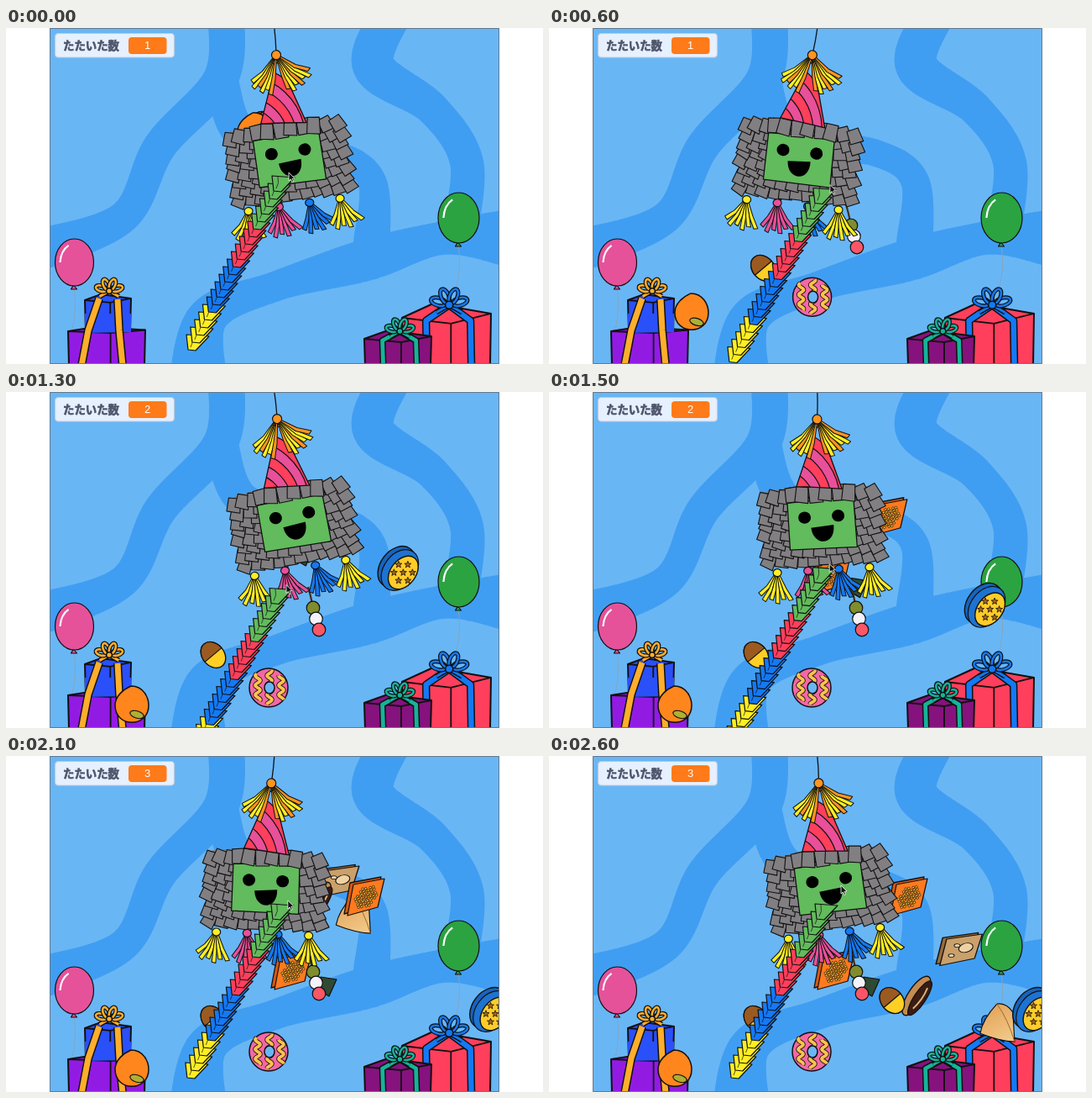
Recreate the animation shown at these times as an HTML page with a canvas. Size 640 by 400 pixels, loop 2.7 s.

```html
<!DOCTYPE html>
<html lang="ja">
<head>
<meta charset="utf-8">
<style>
html, body { margin: 0; width: 100%; height: 100%; overflow: hidden; background: #fff; }
canvas { display: block; }
</style>
</head>
<body>
<canvas id="stage" width="640" height="400"></canvas>
<script>
const c = document.getElementById('stage').getContext('2d');
const LOOP = 2700, STEP = 100, TAU = Math.PI * 2;
const INK = '#111', YELLOW = '#ffee22', ORANGE = '#ff9420', PINK = '#e8509a',
      RED = '#ff3f5c', BLUE = '#1479f5', GREEN = '#62bb5c', GRAY = '#827f82',
      TEAL = '#16b39a', GOLD = '#ffae2b';

// ---------- helpers ----------
const lerp = (a, b, k) => a + (b - a) * k;
const clamp = k => Math.min(1, Math.max(0, k));

function paint(fill, stroke = INK, width = 1.2) {
  if (fill) { c.fillStyle = fill; c.fill(); }
  if (stroke) { c.strokeStyle = stroke; c.lineWidth = width; c.stroke(); }
}
function poly(pts, fill, stroke, width) {
  c.beginPath();
  pts.forEach(p => c.lineTo(...p));
  c.closePath();
  paint(fill, stroke, width);
}
function oval(x, y, rx, ry, fill, stroke, width, turn = 0) {
  c.beginPath();
  c.ellipse(x, y, rx, ry, turn, 0, TAU);
  paint(fill, stroke, width);
}
function curve(from, via, to, stroke = INK, width = 1.2) {
  c.beginPath();
  c.moveTo(...from);
  c.quadraticCurveTo(...via, ...to);
  paint(null, stroke, width);
}
function band(pts, color, width) {
  c.beginPath();
  pts.forEach(p => c.lineTo(...p));
  paint(null, INK, width + 3);
  paint(null, color, width);
}
function at(x, y, turn, draw) {
  c.save();
  c.translate(x, y);
  c.rotate(turn);
  draw();
  c.restore();
}
function randomizer(seed) {
  return () => (seed = (seed * 16807) % 2147483647) / 2147483647;
}
// A centre and a ring of six around it
function cluster(radius, draw) {
  draw(0, 0);
  for (let a = 0; a < TAU - .1; a += TAU / 6) draw(radius * Math.cos(a), radius * Math.sin(a));
}

// ---------- scenery ----------
// Smooth path through [x, y, radius] knots, swept with a round brush
function stream(knots) {
  const knot = i => knots[Math.min(knots.length - 1, Math.max(0, i))];
  c.beginPath();
  for (let i = 0; i < knots.length - 1; i++) {
    for (let k = 0; k < 1; k += 1 / 60) {
      const [x, y, r] = [0, 1, 2].map(j => {
        const [a, b, d, e] = [-1, 0, 1, 2].map(o => knot(i + o)[j]);
        return b + .5 * k * (d - a + k * (2 * a - 5 * b + 4 * d - e + k * (3 * (b - d) + e - a)));
      });
      c.moveTo(x + r, y);
      c.arc(x, y, r, 0, TAU);
    }
  }
  paint('#409ef2', null);
}
function background() {
  c.fillStyle = '#69b6f5';
  c.fillRect(52, 0, 536, 400);
  stream([[262, -20, 22], [256, 60, 21], [184, 140, 20], [140, 225, 19], [40, 264, 25]]);
  stream([[256, 60, 20], [285, 130, 20], [390, 149, 16], [436, 182, 17], [436, 255, 22]]);
  stream([[229, 430, 36], [240, 345, 24], [320, 308, 18], [430, 276, 25], [520, 250, 20], [600, 250, 34]]);
  stream([[462, -20, 23], [438, 45, 25], [508, 96, 20], [549, 160, 20], [540, 245, 22]]);
}
function balloon(x, y, rx, ry, color) {
  curve([x - 1, y + ry], [x + 4, y + ry + 25], [x - 3, y + ry + 54], '#86a4ba', .9);
  poly([[x - 1, y + ry - 1], [x - 4, y + ry + 4], [x + 3, y + ry + 4]], color);
  oval(x, y, rx, ry, color);
  curve([x - rx * .74, y], [x - rx * .7, y - ry * .5], [x - rx * .3, y - ry * .72], '#fff', 2.2);
}
function bow(x, y, s, color) {
  for (const side of [-1, 1]) {
    band([[x, y], [x + side * 12 * s, y + 7 * s]], color, 3);
    for (const [dx, dy, tilt] of [[10, -3, 1.3], [4, -8, .4]]) {
      oval(x + side * dx * s, y + dy * s, 3.6 * s, 7 * s, null, INK, 5, side * tilt);
      oval(x + side * dx * s, y + dy * s, 3.6 * s, 7 * s, null, color, 2.6, side * tilt);
    }
  }
  oval(x, y, 3.5 * s, 3.5 * s, color, INK, 1.5);
}
function box(x, y, w, depth, bottom, color) {
  const left = [x, y], back = [x + w * .35, y - depth],
        right = [x + w, y - depth * .3], front = [x + w * .55, y + depth * .4];
  poly([left, back, right, [x + w - 1, bottom], [x + 1, bottom]], color, INK, 2);
  c.beginPath();
  [left, front, right].forEach(p => c.lineTo(...p));
  c.moveTo(...front);
  c.lineTo(front[0], bottom);
  paint(null, INK, 1.8);
}
function tiedBox(x, y, w, depth, color, ribbon) {
  box(x, y, w, depth, 402, color);
  const knot = [x + w * .53, y - depth * .9];
  for (const side of [.27, .77]) band([knot, [x + w * side, y + depth * .2], [x + w * side + 1, 402]], ribbon, w * .06);
  bow(...knot, w / 82, ribbon);
}
function scenery() {
  balloon(81.5, 279, 23, 28, '#e5529a');
  balloon(539.5, 226, 24.5, 30, '#2ba341');
  box(94, 324, 55, 7, 362, '#2a50fa');
  box(74, 361, 92, 5, 402, '#921be4');
  poly([[94, 340], [149, 340], [149, 362], [94, 363]], '#2a50fa', null);
  band([[111, 322], [98, 360], [90, 402]], GOLD, 7);
  band([[133, 323], [135, 360], [139, 402]], GOLD, 7);
  bow(123, 313, .95, GOLD);
  tiedBox(472, 345, 106, 17, RED, BLUE);
  tiedBox(427, 370, 80, 10, '#86127e', TEAL);
}

// ---------- treats ----------
function orange() {
  c.beginPath();
  c.moveTo(-1, -22);
  c.bezierCurveTo(14, -22, 20, -8, 20, 1);
  c.bezierCurveTo(20, 28, -20, 28, -20, 1);
  c.bezierCurveTo(-20, -10, -10, -18, -1, -22);
  paint('#ff861c', INK, 1.5);
  oval(6, 12, 8.5, 4.2, '#aeb035', INK, 1.2, .3);
}
function donut() {
  oval(0, 0, 23, 23, '#f467a5', INK, 1.5);
  for (const x of [-13, 1, 15]) {
    const h = Math.sqrt(440 - x * x);
    c.beginPath();
    for (let y = -h; y <= h; y++) c.lineTo(x + 3 * Math.sin(y * .55), y);
    paint(null, INK, 5.5);
    paint(null, '#ffc24d', 3.8);
  }
  oval(1, 0, 6, 7, '#69b6f5', INK, 1.5);
}
function acorn() {
  at(0, 0, -.7, () => {
    oval(0, 0, 13, 17, '#ffcf24', INK, 1.4);
    c.beginPath();
    c.ellipse(0, 0, 13, 17, 0, Math.PI, 0);
    c.closePath();
    paint('#9b5a20');
  });
}
function dango() {
  curve([-9, -38], [-6, -28], [-4, -18], '#442c16', 2.2);
  ['#7f8d2d', '#f4f2fa', '#fa5667'].forEach((color, i) => oval(-3 + i * 3.5, -13 + i * 13, 7.8, 7.8, color));
}
function star(x, y) {
  c.beginPath();
  for (let i = 0; i < 10; i++) {
    const r = i % 2 ? 1.8 : 4.2, a = i * Math.PI / 5;
    c.lineTo(x + r * Math.sin(a), y - r * Math.cos(a));
  }
  c.closePath();
  paint('#a5641b', INK, .8);
}
function bowl() {
  oval(-4, -4, 19, 27, '#1764bd', INK, 1.4, .65);
  oval(0, 0, 19, 27, '#1d73d2', INK, 1.2, .65);
  oval(4, 3, 15, 22, '#ffcc28', INK, 1.4, .65);
  cluster(11, (x, y) => star(4 + x, 3 + y));
}
function slab(front, side) {
  const corners = [[-14, -15], [23, -22], [15, 12], [-21, 22]];
  poly(corners.map(([x, y]) => [x - 4, y - 2]), side, INK, 1.3);
  poly(corners, front);
}
function cracker() {
  slab('#ff7a1f', '#d8590f');
  cluster(9, (x, y) => cluster(3.6, (dx, dy) => {
    const u = x + dx, v = y + dy;
    oval(1 + u - v * .22, v - u * .2, 1.4, 1.4, '#ffc233', INK, .7);
  }));
}
function toast() {
  c.save();
  c.scale(1.15, .85);
  slab('#caa06b', '#9a6c3c');
  oval(6, -3, 8, 6, '#efd2a2', INK, 1, -.6);
  for (const i of [0, 1]) oval(-9 + i * 6, 8 - i * 14, 3, 2.4, '#efd2a2', INK, .9);
  c.restore();
}
function leafWrap() {
  poly([[-9, -10], [10, -7], [1, 13], [-11, 6]], '#2f4a32');
}
function eclair() {
  at(0, 0, .58, () => {
    oval(-2, 0, 10, 27, '#c58b50', INK, 1.4);
    oval(3, 0, 7, 24, '#3a1c12');
    curve([4, -15], [7, 0], [3, 15], '#d9b184', 2);
  });
}
function bread() {
  const tone = c.createLinearGradient(-10, -18, 12, 22);
  tone.addColorStop(0, '#e3a55c');
  tone.addColorStop(1, '#f2c988');
  c.beginPath();
  c.moveTo(-1, -22);
  c.quadraticCurveTo(10, -24, 18, -12);
  c.lineTo(20, 23);
  c.quadraticCurveTo(2, 22, -21, 13);
  c.quadraticCurveTo(-18, -4, -1, -22);
  paint(tone);
  curve([-1, -22], [12, -4], [20, 23], '#9a6a35', 1);
}

// Each hit releases a burst that glides from the piñata; newest lies at the back
const ORIGIN = [318, 85];
const bursts = [
  { start: 1700, span: 1000, treats: [[toast, 509, 247], [bread, 559, 343], [eclair, 453, 309], [acorn, 419, 314]] },
  { start: 720, span: 1000, treats: [[cracker, 428, 168], [bowl, 579, 304], [cracker, 341, 256], [leafWrap, 384, 273]] },
  { start: -105, span: 800, treats: [[dango, 369, 270], [acorn, 247, 313], [donut, 313, 352], [orange, 150, 372]] }
];
function drawTreats(t) {
  for (const { start, span, treats } of bursts) {
    if (t < start) continue;
    const k = clamp((t - start) / span);
    for (const [draw, x, y] of treats) at(lerp(ORIGIN[0], x, k), lerp(ORIGIN[1], y, k), 0, draw);
  }
}

// ---------- piñata ----------
const PIVOT = 317.7, HALF_SWING = 605;

// Steady triangle-wave swing, in degrees
function swing(t) {
  const phase = Math.abs(t - 75) / HALF_SWING % 2;
  return -10.4 + 19.4 * (phase < 1 ? phase : 2 - phase);
}
function tassel(x, y, from, to, n, length, colors) {
  for (let i = 0; i < n; i++) {
    const turn = (lerp(from, to, i / (n - 1)) - 90) * Math.PI / 180;
    const len = length * (i % 2 ? 1 : .9), bend = turn * 3;
    at(x, y, turn, () => poly([[-.8, 3], [.8, 3], [2.2 + bend, len * .6], [2.4, len],
      [-2.4, len - 1], [-2 + bend, len * .6]], colors[i % colors.length], INK, 1));
  }
}
function tab(x, y, turn, h) {
  at(x, y, turn, () => poly([[-7, 0], [7, 0], [8, h], [-8, h - 1]], GRAY, INK, 1.1));
}
function fringe() {
  poly([[250, 115], [318, 107], [380, 117], [382, 204], [246, 204]], GRAY, null);
  const rnd = randomizer(4211);
  for (let row = 7; row >= 0; row--) {
    for (let i = -5; i <= 5; i++) {
      const dx = i * 12.4 + (row % 2 ? 2 : -2) + rnd() * 2;
      tab(313.5 + dx, 109 + row * 11.4 + Math.abs(dx) * .1 * (1 - row / 6) + rnd() * 3,
          -dx / 68 * .4 + (rnd() - .5) * .3, 17);
    }
  }
}
function hatOutline() {
  c.beginPath();
  c.moveTo(316, 42);
  c.lineTo(288, 111);
  c.quadraticCurveTo(312, 113, 342, 117);
  c.lineTo(320, 42);
  c.closePath();
}
function hat() {
  c.save();
  hatOutline();
  c.clip();
  for (let r = 90; r > 0; r -= 13) oval(278, 132, r * .8, r, (r - 90) % 2 ? PINK : RED);
  c.restore();
  hatOutline();
  paint(null, INK, 1.3);
}
function pinata() {
  curve([319.8, 0], [319.5, 14], [318, 28], INK, 1.3);
  const tails = [YELLOW, PINK, BLUE, YELLOW], lean = [99, 85, 76, 83];
  const tailX = i => 259 + i * 36.7;
  tails.forEach((color, i) => tassel(tailX(i), 211, lean[i] + 32, lean[i] - 32, 6, 38, [color]));
  fringe();
  tails.forEach((color, i) => oval(tailX(i), 212, 5, 4.5, color));

  poly([[276, 130], [355, 127], [356, 187], [276, 186]], GREEN, INK, 1.3);
  for (let i = 0; i < 6; i++) tab(281 + i * 14, 112, i % 2 ? .12 : -.1, 18 + i % 3);
  for (const x of [295.5, 335.5]) oval(x, 148.5, 7.5, 7.2, '#000', null);
  c.beginPath();
  c.moveTo(302.5, 161);
  c.lineTo(329.5, 159);
  c.bezierCurveTo(331, 184, 304, 184, 302.5, 161);
  paint('#000', null);

  hat();
  tassel(317.5, 32.5, 140, 106, 6, 48, [YELLOW, YELLOW, ORANGE]);
  tassel(317.5, 32.5, 78, 32, 7, 48, [ORANGE, YELLOW, YELLOW]);
  oval(317.5, 32.5, 5.5, 5.5, ORANGE);
}

// ---------- stick, pointer, score ----------
// The stick dips smoothly between hits
function dip(t, centre, half) {
  return Math.abs(t - centre) < half ? Math.cos((t - centre) / half * Math.PI / 2) ** 2 : 0;
}
function reach(t) {
  return [-3 * Math.sin(clamp(t / 2400) * Math.PI), 29 * dip(t, 400, 400) + 58 * dip(t, 1270, 500)];
}
function stick(dx, dy) {
  const bands = [GREEN, RED, BLUE, YELLOW], last = 21;
  for (let i = last; i >= 0; i--) {
    const k = i / last, color = bands[Math.min(3, Math.floor(i / 5.5))];
    at(lerp(331, 229, k) + dx, lerp(177, 366, k) + dy, 0, () => {
      poly([[-14, -1], [13, 1], [-3, 18], [-12, 17]], color, INK, 1.2);
      curve([-7, 0], [-5, 8], [-9, 14], INK, .7);
    });
  }
}
function arrow(x, y) {
  at(x, y, 0, () => poly([[0, 0], [0, 10], [2.4, 8], [4, 11.5], [5.6, 10.8], [4.2, 7.4], [7, 7]], INK, '#fff', .8));
}
function panel(x, y, w, h, fill, stroke) {
  c.beginPath();
  c.roundRect(x, y, w, h, 4);
  paint(fill, stroke);
}
function score(hits) {
  panel(58.5, 6.5, 142, 28.5, '#e6f0ff', '#c0cbdc');
  panel(146, 11, 45.5, 20, '#ff7a18', null);
  c.textBaseline = 'middle';
  c.textAlign = 'left';
  c.font = 'bold 13.4px "Noto Sans CJK JP", "Noto Sans CJK", sans-serif';
  c.fillStyle = c.strokeStyle = '#4d546b';
  c.lineWidth = .6;
  c.fillText('たたいた数', 68, 20.5);
  c.strokeText('たたいた数', 68, 20.5);
  c.fillStyle = '#fff';
  c.textAlign = 'center';
  c.font = '13px "Liberation Sans", Arial, sans-serif';
  c.fillText(hits, 168.5, 21.5);
}

function draw(t) {
  c.fillStyle = '#fff';
  c.fillRect(0, 0, 640, 400);
  c.save();
  c.beginPath();
  c.rect(52, 0, 536, 400);
  c.clip();
  c.lineJoin = 'round';
  background();
  scenery();
  drawTreats(t);
  at(PIVOT, 0, swing(t) * Math.PI / 180, () => {
    c.translate(-PIVOT, 0);
    pinata();
  });
  const [dx, dy] = reach(t), drift = clamp((t - 2300) / 300);
  stick(dx, dy);
  score(bursts.filter(b => t >= b.start).length);
  arrow(337 + dx + 11 * drift, 172 + dy - 18 * drift);
  c.strokeStyle = '#66798c';
  c.lineWidth = 1;
  c.strokeRect(52.5, .5, 535, 399);
  c.restore();
}
function tick() {
  draw(Math.floor(performance.now() % LOOP / STEP) * STEP);
  requestAnimationFrame(tick);
}
tick();
</script>
</body>
</html>
```
